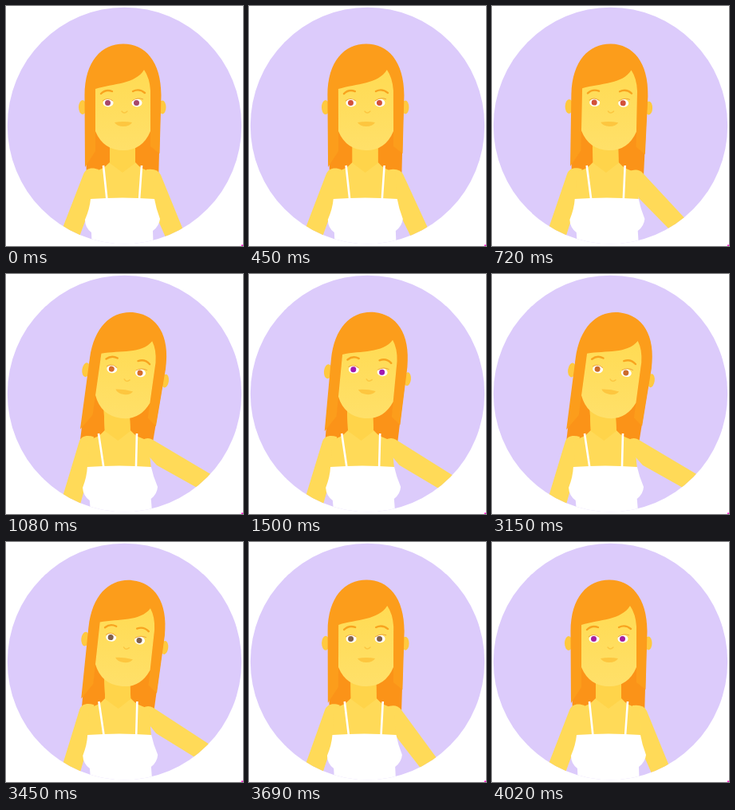
These frames come from a looping animation (297x301 px, 4320 ms). An HTML page:

```html
<!DOCTYPE html>
<html lang="en">
<head>
<meta charset="utf-8">
<title>Portrait</title>
<style>
  html, body { margin: 0; width: 100%; height: 100%; overflow: hidden; background: #fff; }
  svg { display: block; width: 100%; height: 100%; }
</style>
</head>
<body>
<svg viewBox="0 0 297 301">
  <clipPath id="disc"><ellipse cx="148.5" cy="150" rx="146.7" ry="148.3"/></clipPath>
  <linearGradient id="skin" x2="0" y2="1">
    <stop stop-color="#ffdb53"/>
    <stop offset="1" stop-color="#ffe069"/>
  </linearGradient>
  <rect x="295" y="299.5" width="2" height="1.5" fill="#f0c"/>
  <g clip-path="url(#disc)">
    <rect width="297" height="301" fill="#dccbfb"/>

    <g class="head">
      <ellipse cx="96" cy="127" rx="5" ry="9" fill="#ffc93f"/>
      <ellipse cx="196" cy="127" rx="4.5" ry="8.5" fill="#ffc93f"/>
      <path fill="#fb9318" d="M99 110H194L191 220H101Z"/>
    </g>

    <g id="body">
      <path id="rightArm" fill="#ffda58" d="M176 205Q190 203 194 212L238 320L214 322L178 240Z"/>
      <path id="leftArm" fill="#ffda58" d="M116 205C108 202 100 203 97 211L54 322L80 322L109 243Z"/>
      <path fill="#ffda58" d="M130 160V196Q121 206 108 208V246H186L184 208Q170 206 162 196V160Z"/>
      <path fill="#ffd44a" d="M130 160V197L146 209L162 197V160Z"/>
      <path fill="#fff" d="M106 242Q146 239 186 242Q188 254 193 267Q192 276 184 282L185 310H108L107 284Q99 278 99 268Q105 254 106 242Z"/>
      <path fill="none" stroke="#fff" stroke-width="2.6" d="M122 200L126.500 243M170 200L167 243"/>
    </g>

    <g class="head">
      <path fill="#fc9d1b" d="M99 202L98.500 112C98.500 69 120 47.500 147 47.500C174 47.500 194.500 69 194.500 112L192.500 185L181 176V110H112V182Z"/>
      <path fill="url(#skin)" d="M112 104C135 97 162 98 173 80Q180 90 181 106V157Q171 181 147 181Q122 181 112 157Z"/>
      <path fill="none" stroke="#f8a41f" stroke-width="2.4" stroke-linecap="round" d="M119 110Q125 104 133 107M159 107Q167 103 174 109"/>
      <g fill="#fff">
        <ellipse cx="128" cy="121.500" rx="6.500" ry="5"/>
        <ellipse cx="164" cy="121.500" rx="6.500" ry="5"/>
      </g>
      <g id="iris">
        <circle cx="127.500" cy="121.500" r="3.500"/>
        <circle cx="163.500" cy="121.500" r="3.500"/>
      </g>
      <path fill="none" stroke="#efa63c" d="M121 119Q127 114 134 119M158 119Q165 114 172 117"/>
      <path fill="none" stroke="#fbc742" stroke-width="1.500" stroke-linecap="round" d="M145 132Q148 136 152 132"/>
      <path fill="#fdc63f" d="M136 146Q147 144 158 146Q155 151 147 151Q139 151 136 146Z"/>
    </g>
  </g>
</svg>
<script>
const LOOP = 4320;
const lean = [[300, 0], [430, .04], [720, .57], [870, .97], [1080, 1.04], [1500, 1]];
const tilt = [[300, 0], [580, 0], [720, 1.2], [870, 6.2], [1080, 8], [1500, 5.5]];
const irisColors = [
  [0, '#a6476a'], [300, '#d2503a'], [840, '#d56c2a'], [1380, '#a11ab0'],
  [2100, '#cb6a2a'], [3360, '#80604a'], [3900, '#a520a0']
];
const heads = document.querySelectorAll('.head');
const [body, leftArm, rightArm, iris] =
  ['body', 'leftArm', 'rightArm', 'iris'].map(id => document.getElementById(id));

// Smooth curve through [time, value] keys, flat at both ends
function sample(keys, t) {
  const last = keys.length - 1;
  if (t <= keys[0][0]) return keys[0][1];
  if (t >= keys[last][0]) return keys[last][1];
  const i = keys.findIndex(k => k[0] > t) - 1;
  const slope = n => n === 0 || n === last ? 0 :
    (keys[n + 1][1] - keys[n - 1][1]) / (keys[n + 1][0] - keys[n - 1][0]);
  const [t0, a] = keys[i], [t1, b] = keys[i + 1];
  const d = t1 - t0, u = (t - t0) / d, v = 1 - u;
  return v * v * ((1 + 2 * u) * a + u * d * slope(i)) +
    u * u * ((3 - 2 * u) * b - v * d * slope(i + 1));
}

function pose(el, transform) {
  el.setAttribute('transform', transform);
}

function draw(now) {
  const time = now % LOOP;
  const step = Math.floor(time / 30) * 30;
  const t = Math.min(step, LOOP - step); // the way back mirrors the way out
  const p = sample(lean, t);
  const turn = `rotate(${sample(tilt, t)} 147 155)`;
  heads.forEach(head => pose(head, turn));
  pose(body, `translate(${-4 * p} 241) skewX(${2.5 * p}) translate(0 -241)`);
  pose(leftArm, `rotate(${-2 * p} 97 211)`);
  pose(rightArm, `rotate(${-35 * p} 185 217)`);
  iris.setAttribute('fill', irisColors.filter(c => c[0] <= time).pop()[1]);
}

function tick(now) {
  draw(now);
  requestAnimationFrame(tick);
}
draw(0);
requestAnimationFrame(tick);
</script>
</body>
</html>
```
